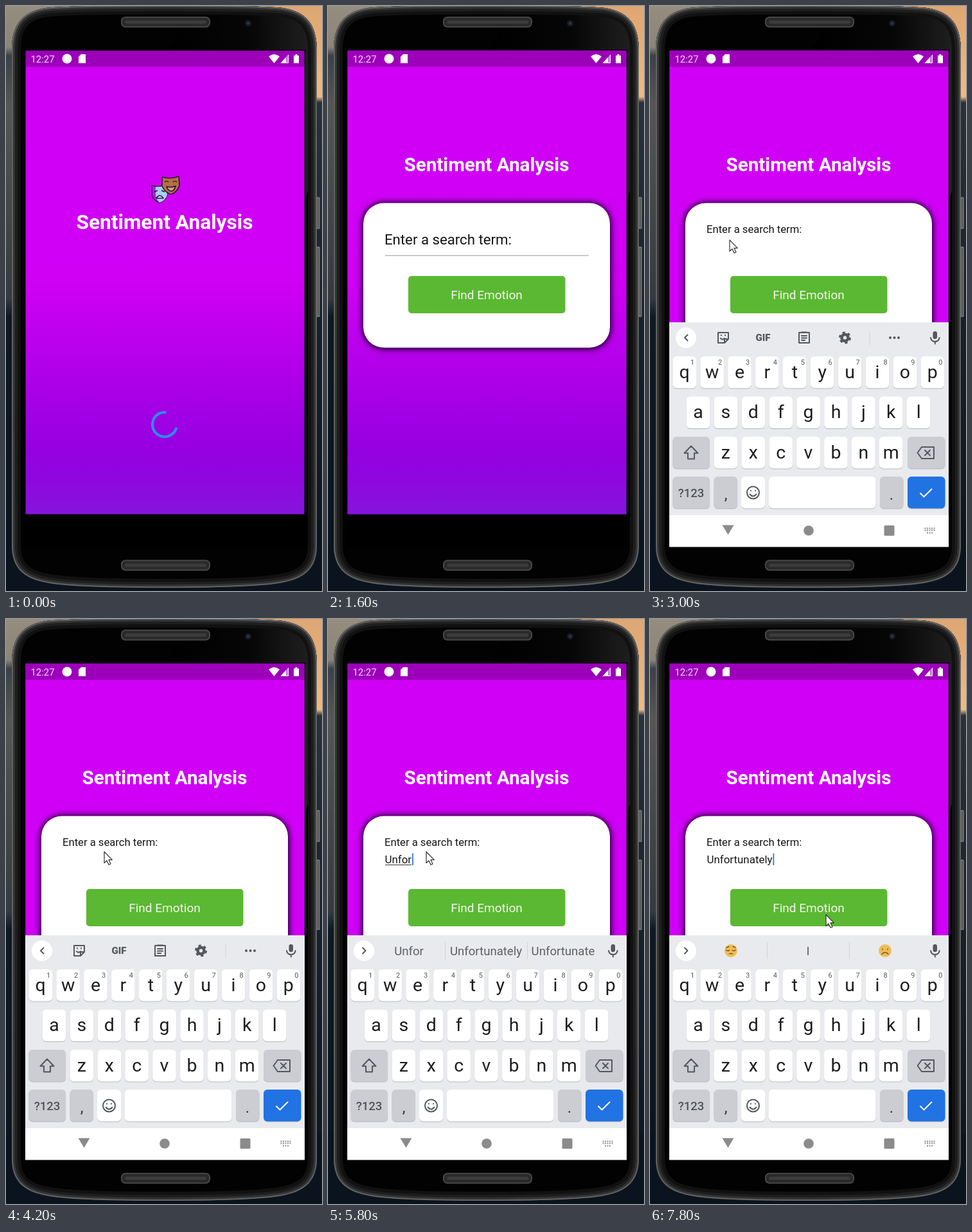
Write an HTML page that moves like this. It is 492 px wide and 910 px high and loops after 8 s.

```html
<!DOCTYPE html>
<html lang="en">
<head>
<meta charset="utf-8">
<title>Sentiment Analysis</title>
<style>
html, body { margin: 0; width: 100%; height: 100%; overflow: hidden; background: #0b141e; }
svg { display: block; width: 492px; height: 910px; font-family: Roboto, sans-serif; }
.mid { text-anchor: middle; }
.title { font-weight: 700; fill: #fff; text-anchor: middle; }
.line { fill: none; stroke: #54585d; stroke-width: 2; stroke-linecap: round; stroke-linejoin: round; }
.card { filter: drop-shadow(0 0 4px rgba(10, 0, 25, .8)) drop-shadow(0 1px 5px rgba(10, 0, 25, .7)); }
.key { filter: drop-shadow(0 1px .6px #b4b7bd); }
</style>
</head>
<body>
<svg id="stage" viewBox="0 0 492 910">
  <defs>
    <linearGradient id="sky" x2="0" y2="1">
      <stop offset="0" stop-color="#958d7e"/><stop offset=".07" stop-color="#8b8579"/>
      <stop offset=".085" stop-color="#3b4148"/><stop offset=".17" stop-color="#555755"/>
      <stop offset=".27" stop-color="#4b4e4f"/><stop offset=".5" stop-color="#343a40"/>
      <stop offset=".53" stop-color="#0f1922"/><stop offset="1" stop-color="#0b141e"/>
    </linearGradient>
    <linearGradient id="dusk" x2="0" y2="1">
      <stop offset="0" stop-color="#dda673"/><stop offset=".155" stop-color="#f0bb80"/>
      <stop offset=".165" stop-color="#28323c"/><stop offset=".5" stop-color="#17222c"/>
      <stop offset="1" stop-color="#0b141e"/>
    </linearGradient>
    <linearGradient id="sheen" x2="1" y2="0">
      <stop offset="0" stop-color="#000"/><stop offset=".55" stop-color="#060606"/>
      <stop offset="1" stop-color="#222"/>
    </linearGradient>
    <linearGradient id="glow" gradientUnits="userSpaceOnUse" x1="0" y1="69" x2="0" y2="791">
      <stop offset="0" stop-color="#d000f6"/><stop offset=".5" stop-color="#cf00f4"/>
      <stop offset=".62" stop-color="#bc00ed"/><stop offset=".85" stop-color="#9700e1"/>
      <stop offset=".93" stop-color="#8d08de"/><stop offset="1" stop-color="#8615db"/>
    </linearGradient>
    <clipPath id="view"><rect x="30.5" y="69.5" width="434" height="721"/></clipPath>
    <path id="body" d="M9 66C10 30 24 9 62 3Q100-1 246-1T431 3C469 9 483 30 484 66V842C483 872 468 890 430 897Q390 905 246 905T63 897C25 890 10 872 9 842Z"/>
    <clipPath id="shell"><use href="#body"/></clipPath>
    <g id="grille">
      <rect x="180" width="137" height="15" rx="6" fill="#292929" stroke="#484848" stroke-width="2"/>
      <rect x="185" y="5" width="127" height="5" rx="2.5" fill="#3c3c3c"/>
    </g>
  </defs>

  <rect width="300" height="910" fill="url(#sky)"/>
  <rect x="300" width="192" height="910" fill="url(#dusk)"/>
  <path d="M0 800H492V910H0Z" fill="#0b141e"/>
  <path d="M484 298h4v48h-4zM484 375h4v108h-4z" fill="#555" stroke="#999"/>
  <g clip-path="url(#shell)">
    <use href="#body" fill="#020202"/>
    <path d="M290 0H484V250L466 300V69H250Z" fill="url(#sheen)"/>
    <g fill="none">
      <use href="#body" stroke="#111" stroke-width="28"/>
      <use href="#body" stroke="#1e1e1e" stroke-width="18"/>
      <use href="#body" stroke="#333" stroke-width="10"/>
      <use href="#body" stroke="#626262" stroke-width="4"/>
    </g>
  </g>
  <rect x="29" y="68" width="437" height="774" fill="#000"/>
  <use href="#grille" y="17.500"/>
  <use href="#grille" y="862.500"/>
  <circle cx="377" cy="27" r="5" fill="#161a25"/><circle cx="377" cy="27" r="2.3" fill="#2b3448"/>

  <g clip-path="url(#view)">
    <g id="splash">
      <rect x="30" y="69" width="435" height="722" fill="url(#glow)"/>
      <g stroke="#2b1145" stroke-width="1.6" stroke-linejoin="round">
        <path d="M227 279Q239 283 250 278L251 294Q248 303 239 306Q229 302 227 294Z" fill="#b21be0"/>
        <path d="M233 281Q243 282 250 278L251 294Q248 303 239 306Q233 300 233 292Z" fill="#a8d0ee" stroke="none"/>
        <path d="M231 289l5-2M242 287l5 2M234 299Q239 291 245 299Z" fill="#e8f2ff"/>
        <path d="M243 266Q256 270 269 265L270 279Q267 289 257 293Q247 290 243 280Z" fill="#b5713f"/>
        <path d="M247 274q3-3 6 0M260 274q3-3 6 0M250 281Q257 283 264 280Q262 288 257 288Q252 287 250 281Z" fill="#d9a06c"/>
      </g>
      <text class="title" x="247" y="347" font-size="31.7">Sentiment Analysis</text>
      <path id="spin" fill="none" stroke="#2b90e6" stroke-width="4"/>
    </g>
    <g id="page">
      <rect id="back" x="30" y="69" width="435" height="722"/>
      <text class="title" x="247" y="257" font-size="29.6">Sentiment Analysis</text>
      <rect class="card" x="55" y="306.5" width="384" height="225" rx="32" fill="#fff"/>
      <text id="label" x="88" fill="#161616">Enter a search term:</text>
      <path id="rule" d="M89 388.3H406" stroke="#b9b9b9" stroke-width="1.6"/>
      <text id="typed" x="88.5" y="380" font-size="16.93" fill="#161616"></text>
      <path id="under" stroke="#333"/>
      <rect id="caret" y="364.5" width="2" height="18.5" fill="#3f83dc"/>
      <rect x="125" y="420" width="244.5" height="58" rx="5" fill="#5bb832"/>
      <text class="mid" x="247" y="456" font-size="19.05" fill="#f5f5f0">Find Emotion</text>
    </g>
    <rect x="30" y="69" width="435" height="25.5" fill="#000" opacity=".25"/>
  </g>

  <g fill="#fff">
    <text x="38.5" y="87.5" font-size="14.9" fill="#f3d9f8">12:27</text>
    <circle cx="95" cy="82" r="7.5"/>
    <path d="M117 75h7v14h-11V79z"/>
    <path d="M409 78.5Q417.500 71.500 426 78.500L417.500 89Z"/>
    <path d="M440 75V89H427.500Z" opacity=".45"/><path d="M436 79.500V89H427.500Z"/>
    <path d="M439.500 76V88.500H428.500" fill="none" stroke="#fff" stroke-width="1"/>
    <path d="M448 77h2.500v-2h3v2h2.500v12h-8z"/>
  </g>

  <g id="board">
    <rect x="30" y="492" width="435" height="300" fill="#e8eaed"/>
    <rect x="30" y="792" width="435" height="49.500" fill="#fff"/>
    <g id="keys"></g>
    <g class="line">
      <path d="M64 684.500l10.500 11h-5.500v9h-10v-9h-5.500z"/>
      <path d="M423 686h19v18h-19l-6.500-9zM428 691l8 8m0-8l-8 8"/>
      <circle cx="160.500" cy="757" r="9.500"/>
      <path d="M155.500 759.500q5 6 10 0M157 754v.2M164 754v.2"/>
      <path d="M421 758l5.500 5.500 12-12" stroke="#fff"/>
    </g>
    <circle cx="56" cy="516" r="16" fill="#fff"/>
    <path id="chev" class="line"/>
    <g fill="#54585d">
      <rect x="440.500" y="506" width="6.500" height="12" rx="3.200"/>
      <path class="line" d="M437 516q1 6 6.800 6t6.800-6M443.800 522v3.500" stroke-linecap="butt"/>
    </g>
    <g id="tools">
      <g class="line">
        <path d="M106 508h16v10l-6 6h-10zM122 518h-6v6M110 517q3 3 6 0M111 512v.5M117 512v.5"/>
        <path d="M232 508h16v16h-16zM236 507.500h8M236 513h8M236 516.500h8M236 520h5"/>
        <circle cx="303.500" cy="516" r="5" stroke-width="4.500"/>
        <circle cx="303.500" cy="516" r="8" stroke-width="3" stroke-dasharray="4.200 4.178" stroke-linecap="butt"/>
        <path d="M374 516h.01M380.500 516h.01M387 516h.01" stroke-width="4"/>
      </g>
      <text class="mid" x="176" y="521" font-size="15" font-weight="900" fill="#54585d">GIF</text>
      <path d="M342 505v23" stroke="#d3d6da"/>
    </g>
    <g id="hints">
      <path d="M182.500 503v26M310.500 503v26" stroke="#d0d3d7"/>
      <g class="mid" font-size="18.6" fill="#5c6065">
        <text x="126" y="523"></text><text x="246" y="523"></text><text x="366" y="523"></text>
      </g>
    </g>
    <g id="faces" fill="#efbd58" stroke="#7b5628" stroke-width="1.400" stroke-linecap="round">
      <circle cx="126" cy="516" r="10" stroke="none"/><circle cx="366" cy="516" r="10" stroke="none"/>
      <path fill="none" d="M118.500 515q3 2.500 5 0M128 515q3 2.500 5 0M119 511l4-1.500M129 509.500l4 1.500M123.500 521q2.500-1.500 5 0M362 513v1.500M370 513v1.500M361 521.500q5-6 10 0"/>
    </g>
  </g>

  <g id="nav" fill="#8b8b8b">
    <path id="home"/>
    <circle cx="247" cy="816" r="7.800"/>
    <rect x="364.500" y="808" width="16" height="16" rx="1.500"/>
    <path d="M427.500 812.500h16M427.500 815.500h16M431 819.500h9" stroke="#8b8b8b" stroke-width="2" stroke-dasharray="2 1.500"/>
  </g>
  <path id="mouse" d="M0 0V17.500L4 13.800 7 20.300 10 19 7 12.600H12.300Z" fill="#fff" stroke="#333" stroke-width="1.200" stroke-linejoin="round"/>
</svg>

<script>
const LOOP = 8000, STEP = 200, TAP = 2680, OPEN = 2900, PICK = 7300;
const $ = id => document.getElementById(id);
const set = (el, attrs) => { for (const k in attrs) el.setAttribute(k, attrs[k]); return el; };
const show = (id, on) => set($(id), { visibility: on ? 'visible' : 'hidden' });
const clamp = v => Math.max(0, Math.min(1, v));
const add = (name, attrs, text = '') => {
  const el = set(document.createElementNS('http://www.w3.org/2000/svg', name), attrs);
  el.textContent = text;
  $('keys').append(el);
};

// Material standard curve, cubic-bezier(.4, 0, .2, 1)
function ease(x) {
  x = clamp(x);
  let lo = 0, hi = 1;
  for (let i = 0; i < 18; i++) {
    const s = (lo + hi) / 2, r = 1 - s;
    if (1.2 * r * r * s + .6 * r * s * s + s * s * s < x) lo = s; else hi = s;
  }
  return lo * lo * (3 - 2 * lo);
}

function addKey(x, y, w, fill) {
  add('rect', { class: 'key', x, y, width: w, height: 49.5, rx: 6, fill });
}

function buildKeys() {
  const pitch = 42.9, white = '#fff', grey = '#cbcdd3';
  const rows = [['qwertyuiop', 53.7, 545], ['asdfghjkl', 75, 607.5], ['zxcvbnm', 117.8, 670]];
  for (const [letters, x0, y] of rows) {
    [...letters].forEach((ch, i) => {
      const x = x0 + i * pitch;
      addKey(x - 18.3, y, 36.6, white);
      add('text', { class: 'mid', x, y: y + 33.8, 'font-size': 28.5, fill: '#1d1e20' }, ch);
      if (y === 545) add('text', { class: 'mid', x: x + 12.5, y: 558, 'font-size': 11, fill: '#55585c' }, (i + 1) % 10);
    });
  }
  addKey(35.4, 670, 57.7, grey);
  addKey(401, 670, 58.5, grey);
  const bottom = [[35.4, 57.7, grey], [99.5, 36.6, grey], [142, 37, white], [185, 166.5, white], [358, 36.5, grey], [401, 58.5, '#2172e3']];
  for (const [x, w, fill] of bottom) addKey(x, 732, w, fill);
  add('text', { class: 'mid', x: 64, y: 764, 'font-size': 18.5, 'font-weight': 500, fill: '#505358' }, '?123');
  add('text', { class: 'mid', x: 118, y: 768, 'font-size': 24, fill: '#333' }, ',');
  add('text', { class: 'mid', x: 376, y: 768, 'font-size': 24, fill: '#333' }, '.');
}

const WORD = 'Unfortunately';
const GUESSES = [['Up', 'Us'], ['Until', 'Under'], ['Unfair', 'Unfold']];

// time, x, y of the pointer tip
const TRAIL = [
  [1900, 494, 430], [2500, 124, 372], [2650, 122, 364], [2800, 122, 364], [3000, 124, 364],
  [3600, 142, 363], [4000, 153, 362], [6700, 153, 362], [7200, 240, 522], [7350, 240, 518], [7750, 274, 460]
];

function pointer(t) {
  let i = 0;
  while (i < TRAIL.length - 2 && TRAIL[i + 1][0] <= t) i++;
  const [a, x, y] = TRAIL[i], [b, u, v] = TRAIL[i + 1];
  const p = clamp((t - a) / (b - a));
  return [x + (u - x) * p, y + (v - y) * p];
}

function spinner(t) {
  const p = (t / 1333 + .4) % 1, turn = t / 2222 + .19;
  const head = 270 * ease(p * 2), tail = 270 * ease(p * 2 - 1);
  const from = -90 + tail + turn * 360 + p * 90, sweep = Math.max(head - tail, 2);
  const at = deg => {
    const a = deg * Math.PI / 180;
    return `${247 + 19 * Math.cos(a)} ${651 + 19 * Math.sin(a)}`;
  };
  return `M${at(from)}A19 19 0 ${sweep > 180 ? 1 : 0} 1 ${at(from + sweep)}`;
}

function draw(t) {
  const enter = clamp((t - 1000) / 300), open = t >= OPEN;
  set($('spin'), { d: spinner(t) });
  show('page', enter > 0);
  set($('page'), { opacity: enter * enter, transform: `translate(0 ${180 * (1 - ease(enter))})` });
  set($('back'), { fill: open ? '#d000f6' : 'url(#glow)' });

  const lift = ease((t - TAP) / 200);
  set($('label'), { 'font-size': 22.2 - 5.55 * lift, y: 370.5 - 17.3 * lift });
  set($('rule'), { opacity: 1 - lift });

  const count = t < 5000 ? 0 : t < PICK ? Math.min(7, Math.floor((t - 5000) / 200) + 1) : WORD.length;
  const text = WORD.slice(0, count), picked = t >= PICK;
  $('typed').textContent = text;
  const end = 88.5 + (count ? $('typed').getComputedTextLength() : 0);
  set($('under'), { d: count && !picked ? `M89 382.500H${end}` : '' });

  const blink = Math.floor((t - 2900) / 500) % 2 !== 0;
  const caret = t >= TAP && (t < 5000 ? blink : t < 6700 || t >= 7200);
  set($('caret'), { x: end + (count ? .8 : 0) });
  show('caret', caret);

  show('board', open);
  show('tools', open && !count);
  show('hints', open && count);
  show('faces', open && picked);
  set($('chev'), { d: count ? 'M54 511.500l4.500 4.500-4.500 4.500' : 'M58.500 511.500l-4.500 4.500 4.500 4.500' });
  const hints = picked ? ['', 'I', ''] : [text, ...(GUESSES[count - 1] || [WORD, 'Unfortunate'])];
  document.querySelectorAll('#hints text').forEach((el, i) => { el.textContent = hints[i]; });

  show('nav', t >= TAP);
  set($('home'), { d: open ? 'M112.500 807.500h18l-9 15z' : 'M128 807.500v17l-15.500-8.500z' });

  const [x, y] = pointer(t);
  show('mouse', t >= TRAIL[0][0]);
  set($('mouse'), { transform: `translate(${x} ${y})` });
}

buildKeys();
const start = performance.now();
let last = -1;
function tick() {
  const t = Math.floor((performance.now() - start) % LOOP / STEP) * STEP;
  if (t !== last) draw(last = t);
  requestAnimationFrame(tick);
}
tick();
</script>
</body>
</html>
```
